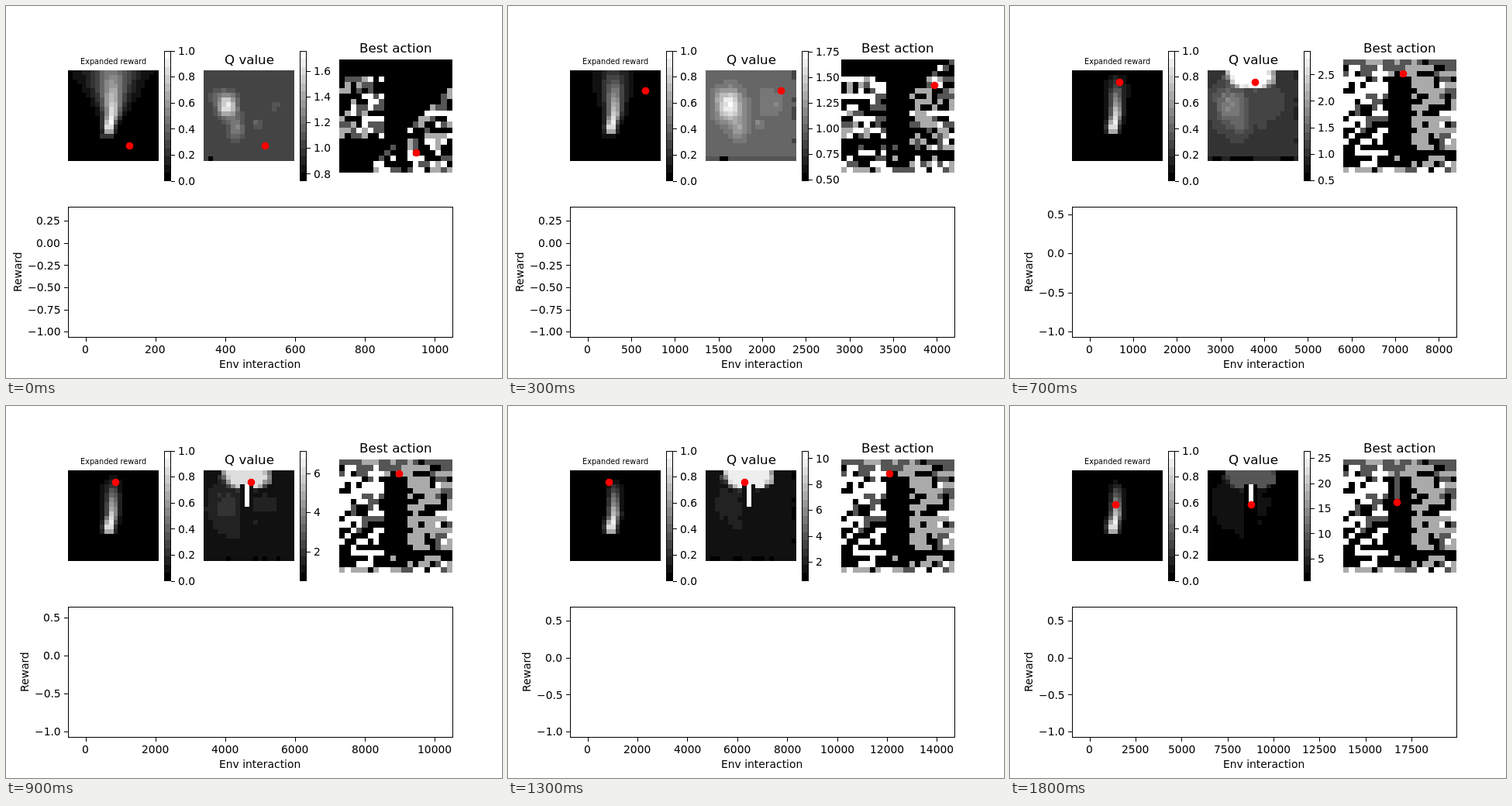
Recreate the animation shown at these times as an HTML page with a canvas. Size 640 by 480 pixels, loop 1900 ms.

```html
<!DOCTYPE html>
<html lang="en">
<head>
<meta charset="utf-8">
<title>Training progress</title>
<style>
html, body { margin: 0; width: 640px; height: 480px; overflow: hidden; background: #fff; }
canvas { display: block; }
</style>
</head>
<body>
<canvas id="stage" width="640" height="480"></canvas>
<script>
const ctx = document.getElementById('stage').getContext('2d');
const STEP = 100, STEPS = 19, N = 20;
const [UP, DOWN, LEFT, RIGHT] = [0, 1, 2, 3];

// Tracks: [step, value...], linear in between.
const agent = [[0, 13, 16], [3, 16, 4], [5, 11, 2], [7, 10, 2], [11, 9, 1], [15, 7, 2], [18, 9, 7]];
const qLow = [[0, .745], [3, .49], [7, .49], [18, .58]];
const qHigh = [[0, 1.757], [5, 1.757], [7, 2.95], [11, 11.35], [15, 9.81], [18, 26.47]];
const best = [[0, .347], [5, .347], [7, .525], [11, .61], [18, .61]];

const clamp = v => Math.max(0, Math.min(1, v));
const gray = v => { v = Math.round(clamp(v) * 15) * 17; return `rgb(${v},${v},${v})`; };

function track(points, k) {
  const i = Math.max(1, points.findIndex(p => p[0] >= k));
  const a = points[i - 1], b = points[i], f = (k - a[0]) / (b[0] - a[0]);
  return a.slice(1).map((v, j) => v + (b[j + 1] - v) * f);
}

function rand(x, y, seed) {
  let h = Math.imul(x + 2, 374761393) ^ Math.imul(y + 1, 668265263) ^ Math.imul(seed + 1, 1274126177);
  h = Math.imul(h ^ (h >>> 13), 1103515245);
  h = Math.imul(h ^ (h >>> 15), 2246822519);
  return ((h ^ (h >>> 16)) >>> 0) / 4294967296;
}

function pick(list, u) {
  return list[Math.floor(u * list.length)];
}

// A cone that narrows to its bright tip and shrinks to a streak with time.
function reward(k, c, r) {
  const top = .7 * Math.exp(-k / 6) - .2, spread = 3.5 * Math.exp(-k / 5) + .1;
  if (r > 14) return 0;
  if (r === 14) return c > 6 && c < 10 ? top * .4 : 0;
  const peak = r === 13 ? .78 : top + (1 - top) * r / 11.5;
  const mid = 9.25 - .75 * clamp((r - 9) / 3);
  const s = .85 + spread * Math.pow(clamp(1 - r / 12), 1.3);
  const d = Math.max(0, Math.abs(c - mid) - .3);
  return clamp(peak) * Math.exp(-Math.pow(d / s, 1.5));
}

const hill = (c, r, x, y, rx, ry) => Math.exp(-(((c - x) / rx) ** 2) - ((r - y) / ry) ** 2);

// Values start at 1; a hill on the left spreads while the top grows.
function qValue(k, c, r, lo, hi) {
  if (r === N - 1) return rand(c, k, 7) < .05 + .04 * Math.min(k, 6) ? lo : 1 - .12 * Math.min(1, k / 5);
  if (c === N - 1 && k > 2 && rand(c, r, 8) < .35) return .8;

  const wide = 1.9 + .22 * k;
  let q = .75 * hill(c, r, 4.8, 7.4, wide, wide * 1.25)
    + .25 * hill(c, r, 6.8, 12.3, 1.6, 2.6)
    + .12 * hill(c, r, 2.5, 5.5, 2, 1.8)
    + .15 * (hill(c, r, 11.3, 11.3, .9, .9) + hill(c, r, 15.3, 7.3, .9, .9))
    + Math.min(.4, .025 * k) * hill(c, r, 14 - k / 9, 6.5, 3, 4);
  q = Math.min(.75, q * (.85 + .3 * rand(c, r, 3)));

  const side = Math.abs(c - 9), growth = 9 * clamp((k - 3) / 8) ** 2;
  if (k > 8 && r > 2 && side < 2) {
    return side === 0 && r < 8 ? hi : 1;
  }
  const d = Math.hypot(side / 5.6, (r - .7) / 3.2) + .15 * (rand(c, r, 4) - .5);
  return 1 + Math.max(q, growth * clamp((1.1 - d) * (1 + k / 5)));
}

// Visited cells act at random at first, then head for the middle column.
function action(k, c, r) {
  const seen = k > 4 || (c < 8 && r > 2 && r < 14) || c + r > 23 - 2 * k;
  const u = rand(rand(c, r, 1) < .3 ? c - 1 : c, r, 2);
  const middle = c > 7 && c < 12 && r > 2;
  if (!seen) return UP;
  if (c === 9 && r > 0 && r < 7 && k > 16) return DOWN;
  if (middle && r < 15) return UP;
  if (rand(c, r, 6) > k / 7) return pick([UP, UP, DOWN, LEFT, RIGHT], u);
  if (r === 0) return pick([DOWN, DOWN, DOWN, UP, LEFT], u);
  if (r === N - 1) return pick([UP, DOWN, LEFT, RIGHT], u);
  if (c < 8) return pick(r < 13 ? [RIGHT, RIGHT, RIGHT, UP, UP, DOWN] : [RIGHT, UP, UP], u);
  if (middle) return pick([UP, UP, UP, LEFT], u);
  if (r < 3) return pick([LEFT, DOWN, UP], u);
  if (r === 16) return UP;
  return pick(c < 17 ? [LEFT, LEFT, LEFT, UP] : [LEFT, LEFT, UP, DOWN, RIGHT], u);
}

function drawMap(x, y, size, cell, dot) {
  const w = size / N, at = (o, i) => Math.round(o + i * w);
  for (let r = 0; r < N; r++) {
    for (let c = 0; c < N; c++) {
      ctx.fillStyle = gray(cell(c, r));
      ctx.fillRect(at(x, c), at(y, r), at(x, c + 1) - at(x, c), at(y, r + 1) - at(y, r));
    }
  }
  ctx.fillStyle = '#f00';
  ctx.beginPath();
  ctx.arc(at(x, dot[0] + .5) + .5, at(y, dot[1] + .5) + .5, 4.86, 0, 7);
  ctx.fill();
}

function ticks(lo, hi, max) {
  let e = Math.floor(Math.log10((hi - lo) / max)), base;
  for (;; e++) {
    base = [1, 2, 2.5, 5].find(b => (hi - lo) / (b * 10 ** e) <= max);
    if (base) break;
  }
  const step = base * 10 ** e, digits = Math.max(0, -e + (base === 2.5 ? 1 : 0)), out = [];
  for (let i = Math.ceil(lo / step); i * step <= hi; i++) {
    const v = i * step;
    out.push([v, (v < 0 ? '\u2212' : '') + Math.abs(v).toFixed(digits)]);
  }
  return out;
}

// Text starts on whole pixels; align is 0 left, .5 centre, 1 right.
function text(s, x, y, align = .5, size = 13.89) {
  ctx.font = `${size}px "DejaVu Sans", sans-serif`;
  ctx.fillStyle = '#000';
  ctx.fillText(s, Math.round(x - ctx.measureText(s).width * align), Math.round(y));
}

function colorbar(x, lo, hi) {
  const top = 57.6, h = 168, left = Math.round(x);
  for (let i = 0; i < 16; i++) {
    const a = Math.round(top + i * h / 16), b = Math.round(top + (i + 1) * h / 16);
    ctx.fillStyle = gray(1 - i / 15);
    ctx.fillRect(left, a, 8, b - a);
  }
  ctx.strokeRect(left + .5, 58.5, 8, 167);
  for (const [v, label] of ticks(lo, hi, 6)) {
    const y = top + h * (hi - v) / (hi - lo);
    ctx.fillStyle = '#000';
    ctx.fillRect(left + 9, Math.round(y), 5, 1);
    text(label, x + 18.1, y + 5.2, 0);
  }
}

function plot(total, yMax) {
  const pad = (yMax + 1) / 22, lo = -1 - pad, hi = yMax + pad;
  ctx.strokeRect(80.5, 259.5, 496, 168);
  for (const [v, label] of ticks(-.05 * total, 1.05 * total, 9)) {
    const x = 80 + 496 * (v / total + .05) / 1.1;
    ctx.fillRect(Math.round(x), 428, 1, 5);
    text(label, x, 448);
  }
  let wide = 0;
  for (const [v, label] of ticks(lo, hi, 6)) {
    const y = 259.2 + 168 * (hi - v) / (hi - lo);
    ctx.fillRect(75, Math.round(y), 5, 1);
    text(label, 70.3, y + 5.2, 1);
    wide = Math.max(wide, label.length);
  }
  text('Env interaction', 328, 467);
  ctx.save();
  ctx.translate(wide > 4 ? 20 : 29, 343);
  ctx.rotate(-Math.PI / 2);
  text('Reward', 0, 0);
  ctx.restore();
}

function draw(k) {
  const dot = track(agent, k).map(Math.round);
  const [lo] = track(qLow, k), [hi] = track(qHigh, k);

  ctx.fillStyle = '#fff';
  ctx.fillRect(0, 0, 640, 480);
  ctx.strokeStyle = '#000';
  ctx.lineWidth = 1;
  drawMap(80, 83, 117, (c, r) => reward(k, c, r), dot);
  drawMap(255, 83, 117, (c, r) => (qValue(k, c, r, lo, hi) - lo) / (hi - lo), dot);
  drawMap(430, 69, 146, (c, r) => action(k, c, r) / 3, dot);
  colorbar(204, 0, 1);
  colorbar(379.06, lo, hi);
  text('Expanded reward', 138.7, 75, .5, 9.72);
  text('Q value', 313.6, 75, .5, 16.67);
  text('Best action', 502.8, 60, .5, 16.67);
  plot((k + 1) * 1000, track(best, k)[0]);
}

const start = performance.now();
let shown = -1;
function tick() {
  const step = Math.floor((performance.now() - start) / STEP) % STEPS;
  if (step !== shown) draw(shown = step);
  requestAnimationFrame(tick);
}
tick();
</script>
</body>
</html>
```
